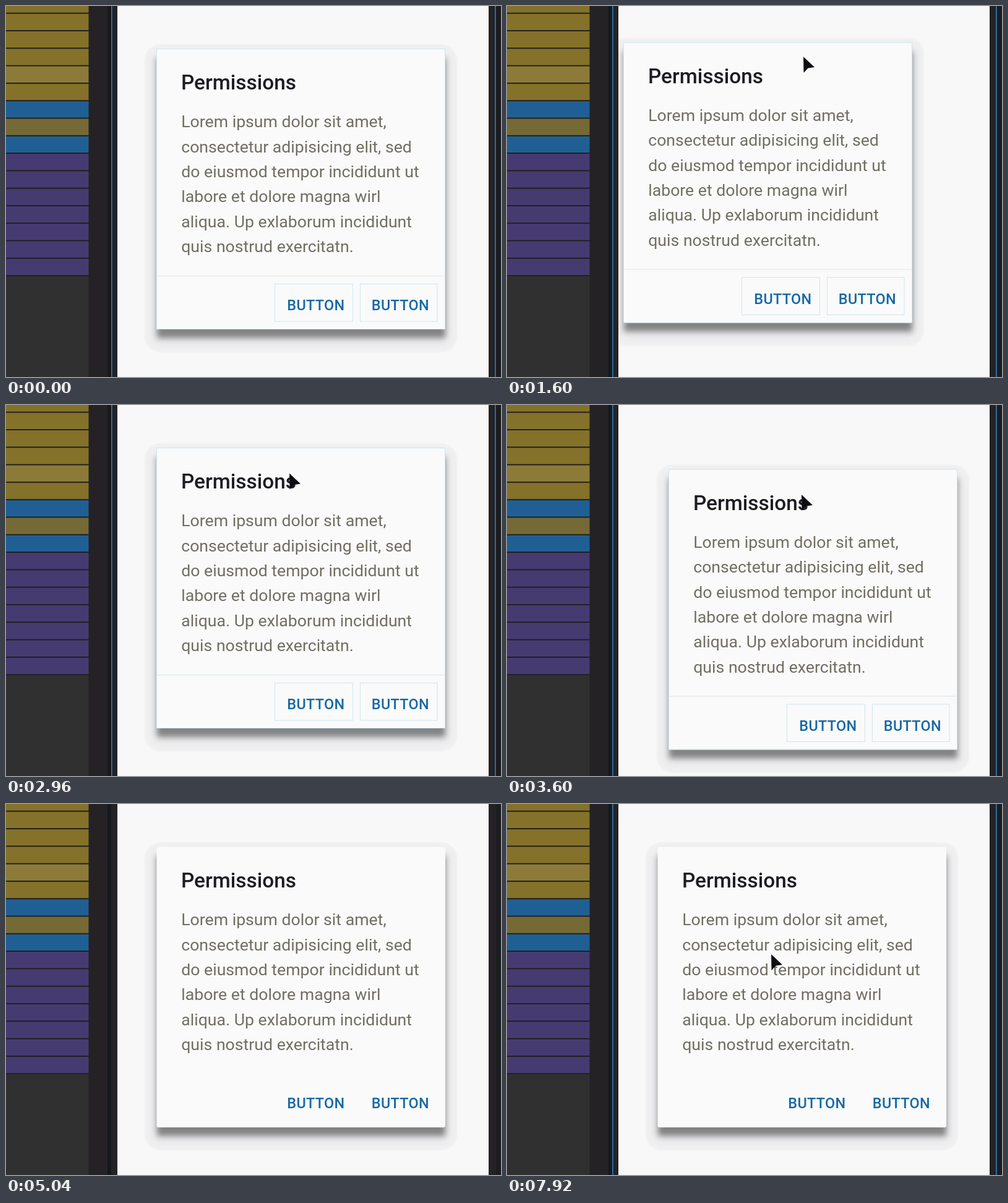
Recreate the animation shown at these times as an HTML page. Size 800 by 600 pixels, loop 8 s.

```html
<!DOCTYPE html>
<html lang="en">
<head>
<meta charset="utf-8">
<title>Dialog layers</title>
<style>
  html, body { margin: 0; width: 100%; height: 100%; overflow: hidden; background: #242225; }
  svg { display: block; width: 100vw; height: 100vh; font-family: Roboto, sans-serif; }
  .title { font-size: 33.33px; font-weight: 500; fill: #1c1c22; }
  .body { font-size: 26.67px; fill: #716e64; }
  .button { font-size: 23.4px; font-weight: 500; letter-spacing: .35px; fill: #1668a4; }
  .outline { fill: none; stroke: #cfe6ee; }
</style>
</head>
<body>
<svg viewBox="0 0 800 600">
  <defs>
    <clipPath id="screen"><rect x="180" width="600" height="600"/></clipPath>
    <filter id="soft" x="-10%" y="-10%" width="120%" height="120%"><feGaussianBlur stdDeviation="5"/></filter>
    <filter id="faint" x="-10%" y="-10%" width="120%" height="120%"><feGaussianBlur stdDeviation="1"/></filter>
  </defs>
  <rect width="800" height="600" fill="#242225"/>
  <rect width="133.5" height="600" fill="#303030"/>
  <g id="layers"><rect width="133.5" height="437" fill="#1f1e1d"/></g>
  <rect x="164" width="6" height="600" fill="#16181c"/>
  <rect x="792" width="8" height="600" fill="#1c1d20"/>
  <g id="frameLines" fill="#2f7fb8">
    <rect x="170" width="1.6" height="600"/>
    <rect x="790" width="1.6" height="600"/>
  </g>
  <rect x="180" width="600" height="600" fill="#f8f8f8"/>
  <g clip-path="url(#screen)">
    <g id="card">
      <rect x="224" y="62" width="505" height="498" rx="26" fill="#f0f0f1" filter="url(#faint)"/>
      <rect x="234" y="74" width="486" height="475" rx="18" fill="#e8e8ea" filter="url(#soft)"/>
      <rect x="244" y="84" width="466" height="453" rx="3" fill="#000" opacity=".43" filter="url(#soft)"/>
      <rect x="243.5" y="69.5" width="466.5" height="453.5" rx="3" fill="#fafafa"/>
      <g id="selection" class="outline">
        <rect x="243.5" y="69.5" width="466" height="453"/>
        <path d="M244 436.5H710" stroke="#dce6ea"/>
        <rect x="434.5" y="449.5" width="126" height="60.5"/>
        <rect x="572.5" y="449.5" width="124.5" height="60.5"/>
      </g>
      <g id="copy" class="body"></g>
      <text class="button" x="454.3" y="492">BUTTON</text>
      <text class="button" x="590.8" y="492">BUTTON</text>
      <text id="title" class="title" x="283" y="135">Permissions</text>
    </g>
  </g>
  <path id="cursor" d="M0 0L18 17L7.5 18.5L.5 26Z" fill="#0e0e12"/>
</svg>
<script>
  const LOOP = 8000, STEP = 80, ROW = 28.3, LINE = 40.35;
  const $ = id => document.getElementById(id);

  function add(parent, tag, attrs, text = '') {
    const el = document.createElementNS('http://www.w3.org/2000/svg', tag);
    for (const name in attrs) el.setAttribute(name, attrs[name]);
    el.textContent = text;
    parent.append(el);
  }

  const gold = '#84712a', blue = '#205f94', purple = '#463b71';
  const rows = [gold, gold, gold, gold, '#8c7b38', gold, blue, '#756a36', blue, ...Array(7).fill(purple)];
  rows.forEach((fill, i) =>
    add($('layers'), 'rect', { y: 12.6 + (i - 1) * ROW, width: 133.5, height: ROW - 1.9, fill }));

  [
    'Lorem ipsum dolor sit amet,',
    'consectetur adipisicing elit, sed',
    'do eiusmod tempor incididunt ut',
    'labore et dolore magna wirl',
    'aliqua. Up exlaborum incididunt',
    'quis nostrud exercitatn.'
  ].forEach((line, i) => add($('copy'), 'text', { x: 283.2, y: 196.3 + i * LINE }, line));

  // The cursor stops at a point, pulls a part by (dx, dy) and brings it back.
  const stop = (peak, span, x, y, part, dx = 0, dy = 0) =>
    ({ start: peak - span / 2, end: peak + span / 2, x, y, part, dx, dy });
  const stops = [
    stop(0, 0, 840, 260),
    stop(1600, 640, 534, 92.5, 'card', -55, -10.5),
    stop(2320, 640, 428.5, 178, 'card', 38.5, 0),
    stop(3600, 1280, 458, 110.5, 'card', 18, 34.5),
    stop(5040, 160, 860, 200),
    stop(6400, 1120, 366, 128, 'title', 2, -83),
    stop(7840, 160, 427, 243)
  ];

  const ease = p => p * p * (3 - 2 * p);
  const mix = (a, b, p) => a + (b - a) * p;
  const place = (id, x, y) => $(id).setAttribute('transform', `translate(${x} ${y})`);
  const show = (id, on) => $(id).setAttribute('visibility', on ? 'visible' : 'hidden');

  function draw(now) {
    const t = Math.floor(now % LOOP / STEP) * STEP;
    const i = stops.findLastIndex(s => s.start <= t);
    const s = stops[i], next = stops[i + 1] || s;
    place('card', 0, 0);
    place('title', 0, 0);
    if (t < s.end) {
      const pull = ease(1 - Math.abs(2 * (t - s.start) / (s.end - s.start) - 1));
      const dx = s.dx * pull, dy = s.dy * pull;
      if (s.part) place(s.part, dx, dy);
      place('cursor', s.x + dx, s.y + dy);
    } else {
      const p = next === s ? 0 : ease((t - s.end) / (next.start - s.end));
      place('cursor', mix(s.x, next.x, p), mix(s.y, next.y, p));
    }
    show('selection', t < 4800);
    show('frameLines', t < 4800 || t >= 5840);
  }

  const start = performance.now();
  function tick() {
    draw(performance.now() - start);
    requestAnimationFrame(tick);
  }
  tick();
</script>
</body>
</html>
```
